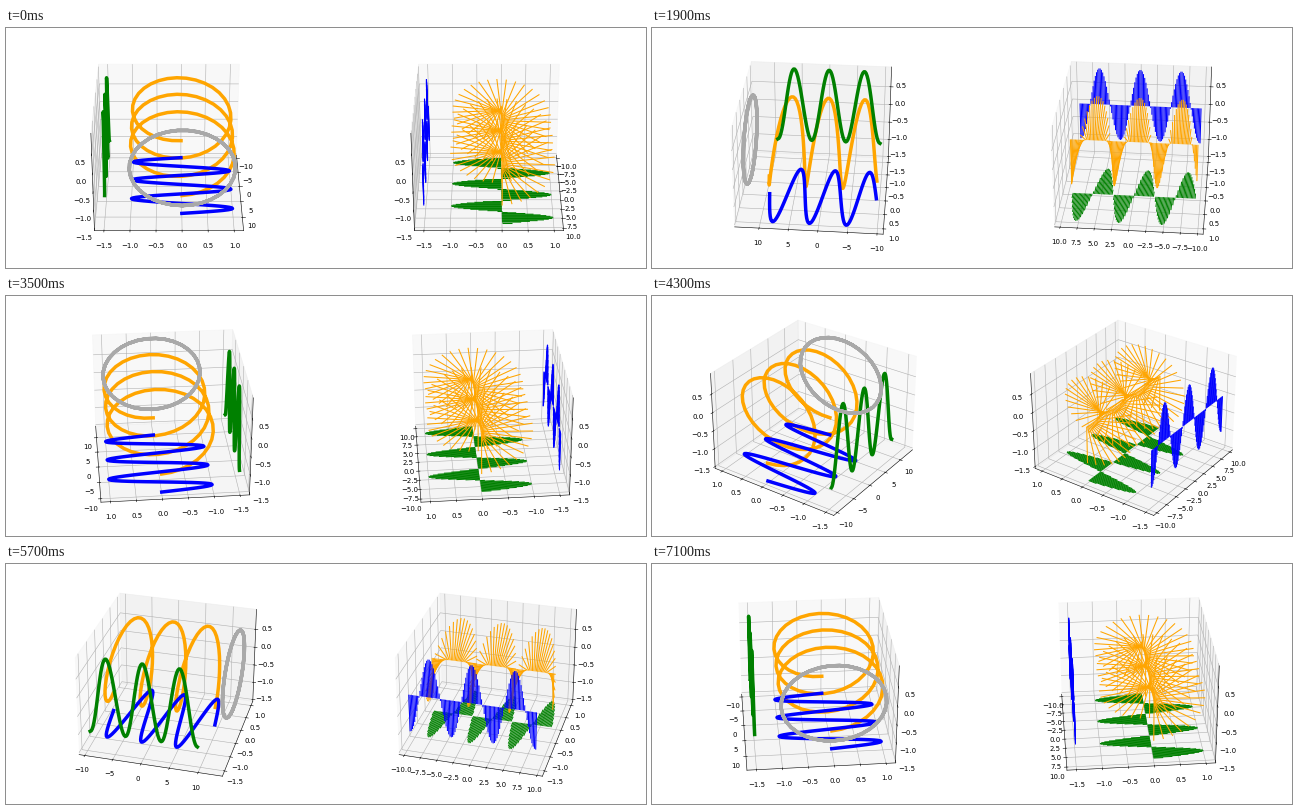
Animation, 640 px wide and 240 px high, one loop 7.2 s. Source, as a matplotlib script:

```python
import numpy as np
import matplotlib.pyplot as plt
from matplotlib.animation import FuncAnimation

FRAMES = 72
INTERVAL = 100
WALL = -1.5   # y of the side wall and z of the floor
LINE = 5

x = np.linspace(-3 * np.pi, 3 * np.pi, 100)
y, z = np.sin(x), np.cos(x)
zero = np.zeros_like(x)
wall = np.full_like(x, WALL)
end = np.full_like(x, 4 * np.pi)


def padded(low, high, margin=0.05):
    """Widen a data range by its margin and by the gap up to the panes."""
    pad = (high - low) * margin
    low, high = low - pad, high + pad
    gap = (high - low) / 48
    return low - gap, high + gap


def setup(ax, x_max, x_step):
    ax.set_xlim(*padded(x.min(), x_max))
    ax.set_ylim(*padded(WALL, y.max()))
    ax.set_zlim(*padded(WALL, z.max(), 0))
    ax.set_xticks(np.arange(-10, 10.1, x_step))
    ax.set_yticks(np.arange(-1.5, 1.1, 0.5))
    ax.set_zticks(np.arange(-1.5, 0.6, 0.5))


fig = plt.figure(figsize=(12.8, 4.8), dpi=50)
fig.subplots_adjust(left=0, right=1, bottom=1 / 32, top=31 / 32, wspace=0)
curves = fig.add_subplot(121, projection="3d")
fields = fig.add_subplot(122, projection="3d")

# Helix with its projections on the floor, the wall and the end plane
curves.plot(x, y, z, color="orange", lw=LINE)
curves.plot(x, y, wall, color="blue", lw=LINE)
curves.plot(x, wall, z, color="green", lw=LINE)
curves.plot(end, y, z, color="darkgray", lw=LINE)
setup(curves, end[0], 5)

# Rotating vectors with their two components
for base_y, base_z, dy, dz, color in (
    (zero, zero, y, z, "orange"),
    (wall, zero, zero, z, "blue"),
    (zero, wall, y, zero, "green"),
):
    fields.quiver(x, base_y, base_z, zero, dy, dz,
                  color=color, arrow_length_ratio=0)
setup(fields, x.max(), 2.5)


def update(i):
    # A hair off zero keeps the choice of visible walls stable
    azim = i * 360 / FRAMES or 1e-3
    for ax in (curves, fields):
        ax.view_init(elev=30, azim=azim)
    return []


anim = FuncAnimation(fig, update, frames=FRAMES, interval=INTERVAL,
                     init_func=lambda: update(0), repeat=True)
plt.show()
```
